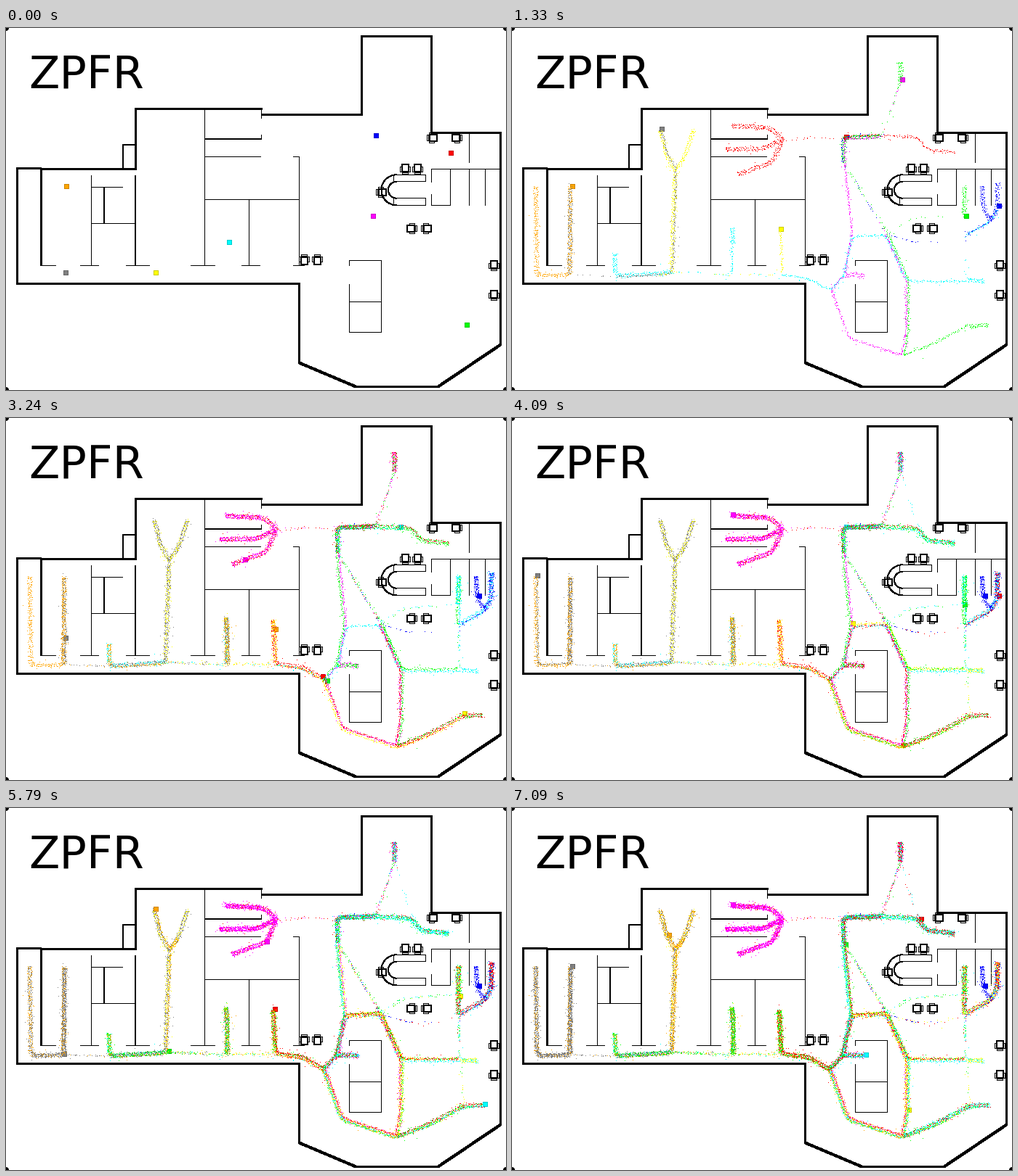
Write a matplotlib script that moves like this. It is 688 px wide and 499 px high and loops after 7120 ms.

```python
import numpy as np
import matplotlib.pyplot as plt
from matplotlib.animation import FuncAnimation
from matplotlib.colors import to_rgb
from matplotlib.patches import Arc, Circle

W, H, DPI = 688, 499, 100
FRAMES, INTERVAL = 178, 40
LEG_ENDS = [0, 33, 59, 102, 128, 144, 177]
SMOOTH = 15
rng = np.random.default_rng(7)

# Junctions and dead ends of the tracks, one character each
NODES = dict(
    a=(32, 216), b=(34, 341), f=(79, 340), g=(80, 217), h=(142, 341),
    j=(141, 308), l=(201, 338), k=(219, 336), m=(224, 196), n=(212, 174),
    o=(203, 138), p=(237, 178), q=(250, 138), r=(304, 340), z=(304, 298),
    t=(302, 272), u=(370, 338), w=(367, 276), x=(408, 343), y=(437, 360),
    A=(462, 428), B=(537, 453), C=(543, 420), D=(544, 347), E=(515, 283),
    F=(466, 286), G=(455, 340), H=(487, 341), X=(501, 258), I=(456, 186),
    J=(455, 151), K=(508, 149), L=(534, 74), M=(534, 44), N=(558, 152),
    O=(569, 168), P=(611, 173), Q=(373, 152), R=(352, 137), S=(299, 134),
    T=(345, 166), U=(291, 167), V=(358, 184), W=(308, 202))
NODES.update({
    "0": (585, 434), "1": (629, 410), "2": (658, 409), "3": (624, 347),
    "4": (651, 348), "5": (622, 284), "6": (622, 215), "$": (622, 258),
    "7": (657, 265), "8": (646, 215), "!": (648, 248), "9": (668, 210),
    "?": (667, 248), "@": (548, 261), "&": (556, 295), "%": (590, 295)})
CHAINS = ("abfg fhlk hj kmno mpq kruxy rzt uw yABCDEFGy GH FIJKLMLN IXE KNOP "
          "JQRS QTU QVW B012 D34 135$6 57 7!8 7?9 E@$ E&%5").split()
SPARSE = {frozenset(s) for s in
          "fh kr ru JQ IX XE KL LN 13 35 E@ @$ E& &% %5".split()}

# Start node, then the stops to reach by each leg end
TOURS = {
    "orange": "g ag jr twB p o kqn",
    "gray": "f gko qktr tkga kg bf ag",
    "yellow": "l oqw ktu B4F IEBF E6$ 9EC",
    "cyan": "z tj4? 936$ 6EPMJ PJH B2 BIH",
    "magenta": "X EBAHJL MUWSR SUWUS UWS UV WUS",
    "blue": "K JE98? 98!",
    "red": "P UWSJ MB20 wH9? 963 w JMPN",
    "lime": "1 2BM6$ 3N PHB6$ wk jtk twI",
}

links = {n: set() for n in NODES}
for chain in CHAINS:
    for p, q in zip(chain, chain[1:]):
        links[p].add(q)
        links[q].add(p)


def route(start, end):
    """Shortest chain of nodes from start to end."""
    best, todo = {start: (0, start)}, [start]
    while todo:
        n = todo.pop(0)
        for m in sorted(links[n]):
            d = best[n][0] + np.hypot(*np.subtract(NODES[n], NODES[m]))
            if m not in best or d < best[m][0] - 1e-9:
                best[m] = (d, best[n][1] + m)
                todo.append(m)
    return best[end][1]


def trace(names):
    """Rounded path with one point per pixel, and which points are sparse."""
    pts = np.array([NODES[c] for c in names], float)
    dist = np.r_[0, np.cumsum(np.hypot(*np.diff(pts, axis=0).T))]
    s = np.arange(0, dist[-1])
    half, kernel = SMOOTH // 2, np.ones(SMOOTH) / SMOOTH
    xy = np.c_[tuple(
        np.convolve(np.pad(np.interp(s, dist, c), half, "edge"), kernel,
                    "valid") for c in pts.T)]
    thin = np.array([frozenset(e) in SPARSE for e in zip(names, names[1:])])
    return xy, thin[np.searchsorted(dist, s, "right") - 1]


def scatter(xy, thin):
    """Shake the points around the right-hand lane; thin out sparse parts."""
    step = np.gradient(xy, axis=0)
    side = np.c_[-step[:, 1], step[:, 0]]
    side /= np.maximum(np.hypot(*side.T), 1e-6)[:, None]
    lane = np.where(thin, 0.5, 1.6)
    spread = np.where(rng.random(len(xy)) < 0.08, 3.5, 0.9)
    noise = rng.normal(size=xy.shape) * spread[:, None]
    keep = rng.random(len(xy)) < np.where(thin, 0.12, 0.9)
    return xy + side * lane[:, None] + noise, keep


def walk(tour):
    """Position in every frame, plus dropped dots as rows (time, x, y)."""
    start, *legs = tour.split()
    track = np.tile(np.array(NODES[start], float), (FRAMES, 1))
    dots = []
    for leg, f0, f1 in zip(legs, LEG_ENDS, LEG_ENDS[1:]):
        names = start
        for stop in leg:
            names += route(names[-1], stop)[1:]
        start = names[-1]
        xy, thin = trace(names)
        pick = np.linspace(0, len(xy) - 1, f1 - f0 + 1).astype(int)
        track[f0:f1 + 1] = xy[pick]
        track[f1:] = xy[-1]
        spots, keep = scatter(xy, thin)
        dots.append(np.c_[np.linspace(f0, f1, len(xy)), spots][keep])
    return track, np.vstack(dots)


colors = [tuple(int(255 * c) for c in to_rgb(name)) for name in TOURS]
tracks, dots = zip(*map(walk, TOURS.values()))
tracks = [np.rint(t + (3, -1)).astype(int) for t in tracks]
inks = np.repeat(np.array([(*c, 255) for c in colors], np.uint8),
                 [len(d) for d in dots], axis=0)
dots = np.vstack(dots)
order = np.argsort(dots[:, 0], kind="stable")
times, inks = dots[order, 0], inks[order]
dot_x, dot_y = np.rint(dots[order, 1:]).astype(int).T

fig = plt.figure(figsize=(W / DPI, H / DPI), dpi=DPI, facecolor="white")
ax = fig.add_axes([0, 0, 1, 1])
ax.set(xlim=(0, W), ylim=(H, 0))
ax.axis("off")


def wall(width, *lines):
    for line in lines:
        x, y = np.array(line, float).reshape(-1, 2).T + width % 2 / 2
        ax.plot(x, y, color="black", lw=width * 72 / DPI, antialiased=False,
                snap=False, solid_joinstyle="round",
                solid_capstyle="projecting")


def box(x0, y0, x1, y1):
    return [x0, y0, x1, y0, x1, y1, x0, y1, x0, y0]


def chair(x, y, turn):
    """Armchair; its back points down, left, up or right for turn 0 to 3."""
    c, s = [(1, 0), (0, 1), (-1, 0), (0, -1)][turn]
    for part in (box(-5, -7, 5, 4), box(-4, -6, 4, 3), box(-7, -3, -5, 4),
                 box(5, -3, 7, 4), box(-4, 5, 4, 7)):
        p = np.array(part).reshape(-1, 2) @ np.array([[c, s], [-s, c]])
        wall(1, (p + (x, y)).ravel())


# Outer walls
wall(3,
     [352, 119, 489, 119, 489, 11, 585, 11, 585, 144, 680, 144, 680, 436,
      594, 494, 481, 494, 403, 461, 403, 352, 15, 352, 15, 193, 47, 193],
     [48, 194, 178, 194, 178, 111, 351, 111], [48, 195, 48, 326])
# Inner walls
wall(2, [161, 194, 161, 161, 178, 161], [178, 204, 178, 326],
     [135, 220, 135, 268], [274, 153, 351, 153])
wall(1, [273, 111, 273, 327], [351, 111, 351, 124], [351, 147, 351, 153],
     [273, 177, 350, 177], [395, 177, 403, 177, 403, 327],
     [273, 236, 403, 236], [334, 236, 334, 327],
     [117, 203, 117, 327], [117, 219, 160, 219], [117, 269, 178, 269])
for x0, x1 in [(48, 68), (102, 127), (165, 197), (254, 287), (324, 349),
               (395, 410)]:
    wall(1, [x0, 327, x1, 327])
wall(1, [637, 144, 637, 185], [680, 194, 585, 194, 585, 212],
     [585, 229, 585, 244, 611, 244])
for x in (611, 637, 659):
    wall(1, [x, 194, x, 244])
wall(1, [472, 327, 472, 320, 516, 320, 516, 419, 472, 419, 472, 353],
     [472, 377, 516, 377])
# Counter
for y0, y1 in [(202, 211), (234, 244)]:
    wall(1, box(533, y0, 577, y1))
for size in (42, 23):
    ax.add_patch(Arc((537.5, 223.3), size, size, theta1=90, theta2=270,
                     lw=72 / DPI, color="black", antialiased=False))
for x, y, turn in [(586, 151, 1), (620, 151, 3), (549, 194, 0), (566, 194, 0),
                   (516, 226, 1), (558, 276, 3), (578, 276, 1), (410, 319, 2),
                   (428, 319, 2), (671, 327, 0), (671, 368, 0)]:
    chair(x, y, turn)
for corner in [(0, 0), (W, 0), (0, H), (W, H)]:
    ax.add_patch(Circle(corner, 4, color="black", lw=0))
ax.text(31, 83, "ZPFR", fontsize=62 * 72 / DPI, family="DejaVu Sans",
        va="baseline")

image = ax.imshow(np.zeros((H, W, 4), np.uint8), extent=(0, W, H, 0),
                  interpolation="nearest", aspect="auto", zorder=5)


def update(frame):
    buf = np.zeros((H, W, 4), np.uint8)
    for color, track in zip(colors, tracks):
        x, y = track[frame]
        buf[y - 3:y + 4, x - 3:x + 4] = (*(int(c * 0.8) for c in color), 255)
        buf[y - 2:y + 3, x - 2:x + 3] = (*color, 255)
    if frame:
        n = np.searchsorted(times, frame, "right")
        buf[dot_y[:n], dot_x[:n]] = inks[:n]
    image.set_data(buf)
    return [image]


anim = FuncAnimation(fig, update, frames=FRAMES, interval=INTERVAL,
                     repeat=True, repeat_delay=0)
plt.show()
```
